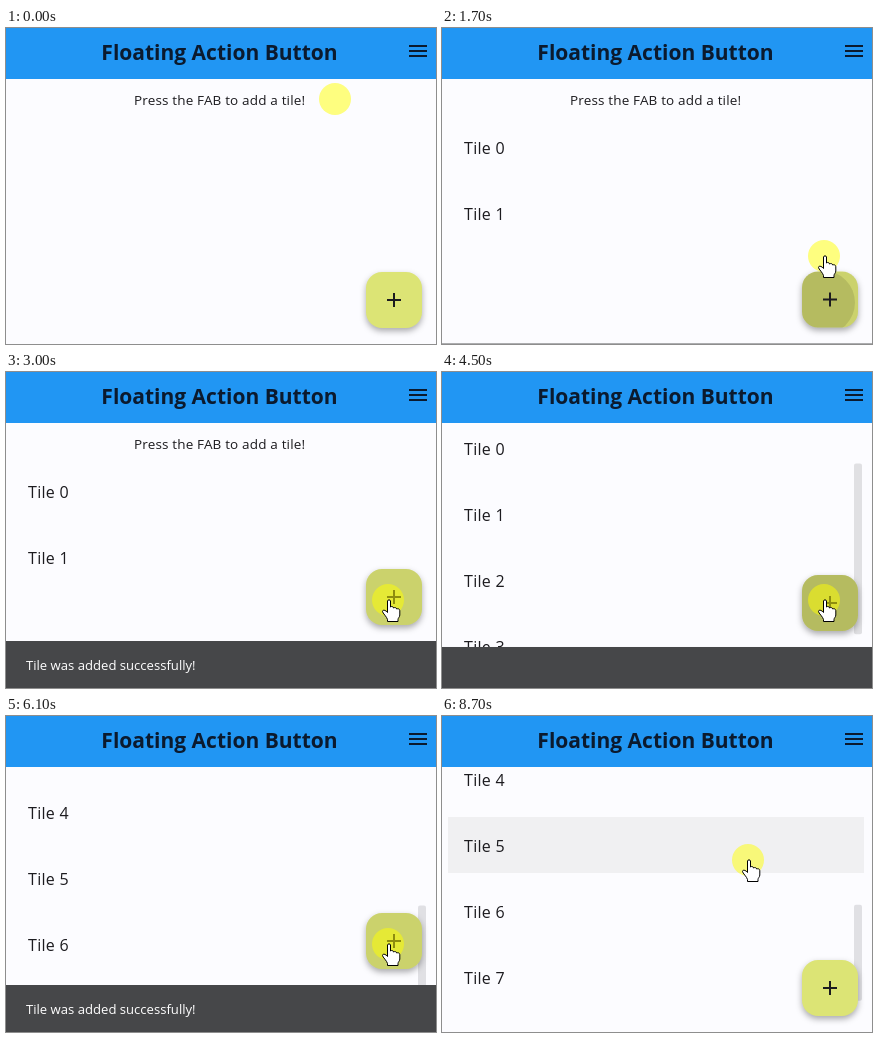
An HTML page for the animation above (8.8 s loop, 430 by 316 pixels).

```html
<!DOCTYPE html>
<html lang="en">
<head>
<meta charset="utf-8">
<title>Floating Action Button</title>
<style>
  html, body { margin: 0; width: 100%; height: 100%; overflow: hidden; background: #fcfcff; }
  svg { display: block; font-family: "Open Sans", "Noto Sans", sans-serif; fill: #1c1b1f; }
  .title { font-size: 21px; font-weight: 700; fill: #0b1a2e; }
  .hint { font-size: 13.5px; letter-spacing: .16px; }
  .tile text { font-size: 16px; letter-spacing: .3px; }
  .tile rect { fill: #f0f0f2; }
  .note { font-size: 13.1px; fill: #fff; }
  #fab { filter: drop-shadow(0 3px 3px rgba(0, 0, 0, .33)); }
</style>
</head>
<body>
<svg width="430" height="316" viewBox="0 0 430 316">
  <defs>
    <clipPath id="body"><rect y="51" width="430" height="265"/></clipPath>
    <clipPath id="fabShape"><rect width="56" height="56" rx="16"/></clipPath>
  </defs>
  <rect width="430" height="316" fill="#fcfcff"/>
  <g clip-path="url(#body)">
    <g id="list">
      <text class="hint" x="128" y="77">Press the FAB to add a tile!</text>
    </g>
    <rect id="thumb" x="412" width="8" rx="2" fill="#1c1b1f"/>
  </g>
  <rect width="430" height="51" fill="#2196f3"/>
  <text class="title" x="213.5" y="32" text-anchor="middle">Floating Action Button</text>
  <path d="M403 18h18M403 23h18M403 28h18" stroke="#0b1a2e" stroke-width="2"/>
  <g id="snack">
    <rect width="430" height="60" fill="#464749"/>
    <text id="note" class="note" x="20" y="29">Tile was added successfully!</text>
  </g>
  <g id="fab">
    <rect width="56" height="56" rx="16" fill="#dce475"/>
    <g clip-path="url(#fabShape)">
      <rect id="hover" width="56" height="56" fill="#000"/>
      <circle id="ripple" cx="21" cy="31" fill="#000"/>
    </g>
    <path d="M21 28h14M28 21v14" stroke="#1c1b1f" stroke-width="2"/>
  </g>
  <g id="pointer">
    <circle r="16" fill="#ff0" fill-opacity=".5"/>
    <path id="arrow" transform="translate(1 1)" fill="#000" stroke="#fff" stroke-width=".6"
      d="M0 0V14L3.3 11L5.8 16.5L8 15.5L5.6 10.2H10Z"/>
    <path id="hand" transform="translate(1 0)" fill="#fff" stroke="#000" stroke-linejoin="round"
      d="M-1.5 1C-1.5 -.5 1.5 -.5 1.5 1V7C2.5 6 4.5 6.5 4.5 8C6 7 7.5 7.8 7.7 9C9 8.3 10.8 9 10.8 10.7V15C10.8 17 9 18 9 19.5V21.5H-1.5V19.5C-2 17 -6.5 13 -6.5 11.5C-6.5 9.5 -3.5 9.8 -1.5 12.5Z"/>
  </g>
</svg>
<script>
const LOOP = 8800, STEP = 66, SNACK = 47;
const adds = [900, 1700, 3750, 4355, 4820, 5280, 5680, 6220];
const wheel = [[6850, 353], [7500, 49], [7700, 0], [8000, 0], [8700, 320]];
const path = [
  [200, 329, 71], [600, 385, 268], [1050, 385, 268], [1400, 382, 228],
  [6500, 382, 228], [6900, 325, 150], [8000, 325, 150], [8400, 306, 144]
];

const $ = id => document.getElementById(id);
const part = (t, from, to) => Math.min(1, Math.max(0, (t - from) / (to - from)));
const smooth = p => p * p * (3 - 2 * p);
const same = p => p;
const set = (el, attrs) => { for (const k in attrs) el.setAttribute(k, attrs[k]); };
const move = (el, x, y) => el.setAttribute("transform", `translate(${x} ${y})`);

// Value of one column of a keyframe list at time t.
function track(keys, t, col, ease) {
  let i = 0;
  while (i < keys.length - 2 && t >= keys[i + 1][0]) i++;
  const a = keys[i], b = keys[i + 1];
  return a[col] + (b[col] - a[col]) * ease(part(t, a[0], b[0]));
}

function make(tag, attrs, parent) {
  const el = document.createElementNS("http://www.w3.org/2000/svg", tag);
  set(el, attrs);
  return parent.appendChild(el);
}

const tiles = adds.map((_, i) => {
  const g = make("g", { class: "tile" }, $("list"));
  move(g, 0, 91 + STEP * i);
  const back = make("rect", { x: 6, width: 416, height: 56 }, g);
  make("text", { x: 22, y: 35 }, g).textContent = "Tile " + i;
  return { g, back };
});

const maxScroll = n => Math.max(0, STEP * n - 175);

function scrollAt(t, count, last) {
  if (t >= wheel[0][0]) return track(wheel, t, 1, same);
  const from = maxScroll(count - 1);
  return from + (maxScroll(count) - from) * smooth(part(t, last, last + 400));
}

function draw(t) {
  const count = adds.filter(a => t >= a).length;
  const last = count ? adds[count - 1] : Infinity;
  const scroll = scrollAt(t, count, last);
  const x = track(path, t, 1, smooth), y = track(path, t, 2, smooth);
  const onFab = x > 360 && y > 197;

  move($("list"), 0, -scroll);
  tiles.forEach(({ g, back }, i) => {
    const top = 91 + STEP * i - scroll;
    g.style.display = i < count ? "" : "none";
    back.style.display = !onFab && y >= top && y <= top + 56 ? "" : "none";
  });

  const ratio = 241 / (76 + STEP * count);
  set($("thumb"), {
    y: 61 + scroll * ratio,
    height: 241 * ratio,
    opacity: .12 * part(t, 3750, 3950)
  });

  const rise = count ? part(t, last, last + 250) : 0;
  const up = SNACK * (1 - (1 - rise) ** 2.35) * (1 - smooth(part(t, 8000, 8250)));
  move($("snack"), 0, 316 - up);
  set($("note"), { opacity: part(rise, .6, 1) });

  move($("fab"), 360, 244 - up);
  set($("hover"), { opacity: onFab ? .08 : 0 });
  const down = adds.filter(a => t >= a - 50).pop();
  const age = down ? t - down + 50 : 0;
  set($("ripple"), { r: 47 * part(age, 0, 75), opacity: .11 * (1 - part(age, 250, 450)) });

  move($("pointer"), x, y);
  const hand = onFab || t >= 8000;
  $("hand").style.display = hand ? "" : "none";
  $("arrow").style.display = !hand && t >= 200 ? "" : "none";
}

const start = performance.now();
function frame() {
  draw((performance.now() - start) % LOOP);
  requestAnimationFrame(frame);
}
frame();
</script>
</body>
</html>
```
